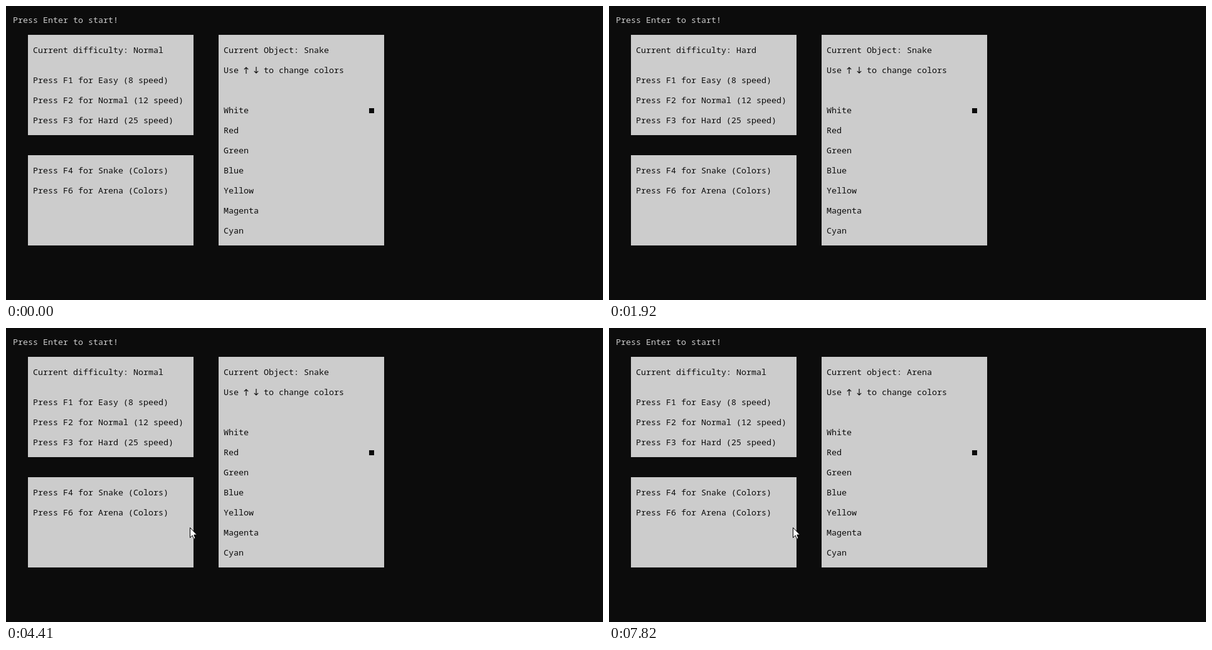
An HTML page that plays this animation: 952x469 px, repeating every 8000 ms.

```html
<!DOCTYPE html>
<html lang="en">
<head>
<meta charset="utf-8">
<title>Snake menu</title>
<style>
  html, body { margin: 0; width: 100%; height: 100%; overflow: hidden; background: #0c0c0c; }
  svg { display: block; width: 952px; height: 469px; }
  text { font: 13.333px "Noto Sans Mono", "DejaVu Sans Mono", monospace; fill: #0c0c0c; white-space: pre; }
  .panel { fill: #ccc; }
  .arrow { fill: none; stroke: #0c0c0c; stroke-width: 1.2; }
</style>
</head>
<body>
<svg id="stage" viewBox="0 0 952 469"></svg>
<script>
const LOOP = 8000;
const stage = document.getElementById('stage');

function add(tag, attrs, content = '') {
  const el = document.createElementNS('http://www.w3.org/2000/svg', tag);
  for (const key in attrs) el.setAttribute(key, attrs[key]);
  el.textContent = content;
  stage.append(el);
  return el;
}

// Console grid: 8 x 16 cells, origin at (11, 14).
const colX = col => 11 + col * 8;
const rowY = row => 14 + row * 16;
const panel = (col, row, cols, rows) => add('rect', {
  class: 'panel', x: colX(col), y: rowY(row), width: cols * 8, height: rows * 16
});
const write = (col, row, str) => add('text', { x: colX(col), y: rowY(row) + 13 }, str);

panel(3, 2, 33, 10);
panel(3, 14, 33, 9);
panel(41, 2, 33, 21);

write(0, 0, 'Press Enter to start!').style.fill = '#ccc';
const difficulty = write(4, 3, '');
write(4, 6, 'Press F1 for Easy (8 speed)');
write(4, 8, 'Press F2 for Normal (12 speed)');
write(4, 10, 'Press F3 for Hard (25 speed)');
write(4, 15, 'Press F4 for Snake (Colors)');
write(4, 17, 'Press F6 for Arena (Colors)');

const object = write(42, 3, '');
write(42, 5, 'Use');
add('path', { class: 'arrow', d: 'M383 108V98M379.8 101.2L383 98l3.2 3.2' });
add('path', { class: 'arrow', d: 'M399 97V107M395.8 103.8L399 107l3.2-3.2' });
write(50, 5, 'to change colors');
['White', 'Red', 'Green', 'Blue', 'Yellow', 'Magenta', 'Cyan']
  .forEach((name, i) => write(42, 9 + i * 2, name));

const marker = add('rect', { x: 579, width: 8, height: 8, fill: '#0c0c0c' });
const pointer = add('path', {
  d: 'M.5.5V16.5L4.2 13l2.5 5.5 2.4-1L6.8 12h4.7Z',
  fill: '#fff', stroke: '#000', 'stroke-width': 1
});

// Each track lists [start time, value]; values switch without easing.
const levels = [[0, 'Normal'], [990, 'Hard'], [1150, 'Easy'], [1300, 'Normal'],
  [1610, 'Easy'], [1690, 'Normal'], [1920, 'Hard'], [2470, 'Normal']];
const objects = [[0, 'Object: Snake'], [6810, 'object: Arena']];
const choices = [[0, 0], [4410, 1], [4710, 2], [7750, null], [7820, 1]];
const pointers = [[0, null], [2550, [294, 395]], [2630, [294, 358]],
  [2700, [293, 330]], [2780, [293, 318]]];

const valueAt = (track, t) => track.filter(([start]) => start <= t).pop()[1];

function show(el, visible) {
  el.setAttribute('visibility', visible ? 'visible' : 'hidden');
}

function draw(t) {
  difficulty.textContent = 'Current difficulty: ' + valueAt(levels, t);
  object.textContent = 'Current ' + valueAt(objects, t);

  const choice = valueAt(choices, t);
  show(marker, choice !== null);
  marker.setAttribute('y', 163 + choice * 32);

  const spot = valueAt(pointers, t);
  show(pointer, spot);
  if (spot) pointer.setAttribute('transform', `translate(${spot})`);
}

const begin = performance.now();
function tick() {
  draw((performance.now() - begin) % LOOP);
  requestAnimationFrame(tick);
}
draw(0);
requestAnimationFrame(tick);
</script>
</body>
</html>
```
